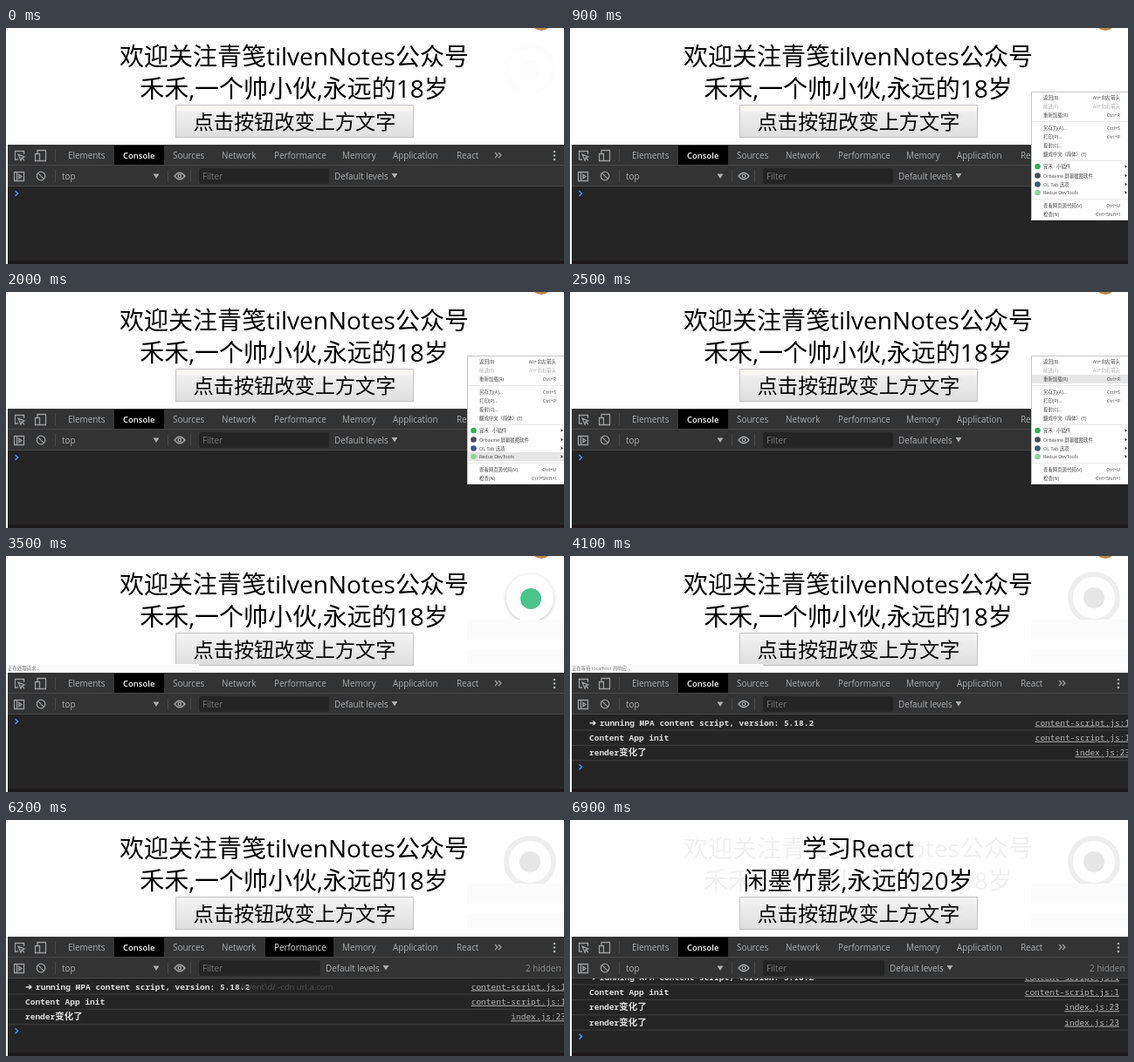
These frames come from a looping animation (639 by 271 pixels, 8000 ms). An HTML page:

```html
<!DOCTYPE html>
<html lang="zh">
<head>
<meta charset="utf-8">
<title>Console demo</title>
<style>
html, body { margin: 0; width: 100%; height: 100%; overflow: hidden; background: #fff; }
svg { display: block; width: 639px; height: 271px; }
text { font-family: "Open Sans", "Noto Sans CJK SC", "Noto Sans CJK", sans-serif; white-space: pre; }
.head { font-size: 28px; text-anchor: middle; }
.ui { font-size: 9.9px; fill: #a9adb2; }
.log, .link { font: 600 9.5px "Noto Sans Mono", "Noto Sans CJK SC", monospace; fill: #dcdcdc; }
.link { font-weight: 400; fill: #b4b4b4; text-anchor: end; text-decoration: underline; }
.item { font-size: 5.4px; fill: #444; }
.icon { fill: none; stroke: #9a9ea3; stroke-width: 1.3; }
</style>
</head>
<body>
<svg viewBox="0 0 639 271">
  <defs>
    <linearGradient id="face" x2="0" y2="1">
      <stop stop-color="#f4f4f4"/><stop offset="1" stop-color="#dedede"/>
    </linearGradient>
    <filter id="soft" x="-30%" y="-30%" width="160%" height="160%">
      <feDropShadow dx="0" dy="1" stdDeviation="2" flood-opacity=".25"/>
    </filter>
    <clipPath id="console"><path d="M2 182H639V267H2z"/></clipPath>
  </defs>

  <circle id="avatar" cx="613" cy="-9" r="12" fill="#b98a4a"/>
  <g id="ring">
    <circle cx="600" cy="48" r="27" fill="none" stroke="#eee" stroke-width="6"/>
    <circle cx="600" cy="48" r="12" fill="#e6e6e6"/>
  </g>
  <g id="badge">
    <circle cx="600" cy="48" r="27" fill="#fff" filter="url(#soft)"/>
    <circle cx="601" cy="49" r="12" fill="#4cc38a"/>
  </g>
  <path id="trace" d="M528 73H639V96H528zM528 108H639V124H528z" fill="#fbfbfb"/>

  <g id="before" class="head">
    <text x="330" y="43">欢迎关注青笺tilvenNotes公众号</text>
    <text x="330" y="80">禾禾,一个帅小伙,永远的18岁</text>
  </g>
  <g id="after" class="head">
    <text x="330" y="43">学习React</text>
    <text x="330" y="80">闲墨竹影,永远的20岁</text>
  </g>
  <rect x="194.5" y="88.5" width="272" height="37" fill="url(#face)" stroke="#c4c4c4"/>
  <path id="shine" d="M195 89H466V95H195z" fill="#f8f7f1"/>
  <text x="330.5" y="116" font-size="23.2" text-anchor="middle">点击按钮改变上方文字</text>

  <g id="status">
    <path d="M0 124H221V133H0z" fill="#fafafa"/>
    <text id="statusText" x="2" y="130.6" font-size="5.4" fill="#777"></text>
  </g>

  <path d="M2 134H639V271H2z" fill="#242424"/>
  <path d="M2 134H639V182H2z" fill="#333"/>
  <path d="M2 157.5H639M2 181.5H639M56.5 139V153M56.5 163V177M185.5 163V177M211.5 163V177" stroke="#484848"/>
  <path d="M2 267H639V271H2z" fill="#1d191a"/>
  <path d="M124 135H181V157H124z"/>
  <path id="hoverTab" d="M297 135H375V157H297z"/>
  <g id="tabs"></g>
  <g class="icon">
    <path d="M14 151H10.5V141.5H20.5V145M14 145L21 148L18 149L17 152zM18 149L21 152"/>
    <path d="M36 144V140.5H45.5V152.5H39M33.500 144.500H38.500V152.500H33.500z"/>
    <path d="M560 143L563 146L560 149M564 143L567 146L564 149"/>
    <path d="M9.500 165.500H20.500V175.500H9.500zM12.500 165V176M15 168.500L18 170.500L15 172.500z"/>
    <circle cx="40" cy="170" r="4.800"/><path d="M36.600 166.600L43.400 173.400"/>
    <path d="M193 170Q199 162.500 205 170Q199 177.500 193 170z"/><circle cx="199" cy="170" r="1.800"/>
  </g>
  <g fill="#a9adb2">
    <circle cx="628" cy="142" r="1.300"/><circle cx="628" cy="146.500" r="1.300"/><circle cx="628" cy="151" r="1.300"/>
    <path d="M168.500 167.500H175.500L172 173z"/>
  </g>
  <text class="ui" x="64" y="173.500">top</text>
  <rect id="field" x="221" y="161" height="18" rx="2" fill="#242424"/>
  <text class="ui" x="225" y="173.500" style="fill:#777">Filter</text>
  <g id="levels">
    <text class="ui" x="376" y="173.500">Default levels</text>
    <path d="M441.500 167H448.500L445 172.500z" fill="#a9adb2"/>
  </g>
  <text id="hidden" class="ui" x="595" y="173.500" style="fill:#85898d">2 hidden</text>

  <g clip-path="url(#console)">
    <g id="rows"></g>
    <path id="prompt" d="M10.500 -3L13.500 0L10.500 3" fill="none" stroke="#3a8bef" stroke-width="1.600"/>
    <text id="tip" x="268" y="195" font-size="9.500" fill="#505050">/event\d/ -cdn url:a.com</text>
  </g>

  <g id="menu">
    <rect x="528.5" y="73.500" width="113" height="147" fill="#fff" stroke="#c8c8c8"/>
    <rect id="hoverItem" x="529" width="110" height="10" fill="#e6e6e6"/>
    <path d="M529 107.500H639M529 152.500H639M529 196.500H639" stroke="#e8e8e8"/>
    <g id="items"></g>
  </g>
</svg>
<script>
const $ = id => document.getElementById(id);
const LOOP = 8000, ROW = 17.4, TOP = 191;

$('tabs').innerHTML = [['Elements', 71], ['Console', 134], ['Sources', 191], ['Network', 247],
  ['Performance', 307], ['Memory', 385], ['Application', 443], ['React', 516]]
  .map(([name, x]) => `<text class="ui" id="tab${name}" x="${x}" y="150">${name}</text>`).join('');
$('tabConsole').style.cssText = 'fill:#fff;font-weight:600;font-size:9.5px';

const cjk = s => `<tspan font-size="10.5" style="font-size:10.5px">${s}</tspan>`;
const render = 'render' + cjk('变化了');
$('rows').innerHTML = [
  ['➔<tspan x="34">running MPA content script, version: 5.18.2</tspan>', 'content-script.js:1'],
  ['Content App init', 'content-script.js:1'],
  [render, 'index.js:23'],
  [render, 'index.js:23']
].map(([msg, file], i) => {
  const y = TOP + i * ROW;
  return `<g><text class="log" x="22" y="${y + 3.5}">${msg}</text>
    <text class="link" y="${y + 3.5}">${file}</text>
    <path d="M2 ${y + 9}H639" stroke="#3c3c3c"/></g>`;
}).join('');
const rows = [...$('rows').children], links = document.querySelectorAll('.link');

// label, centre y, shortcut or '>' for a submenu, icon colour
$('items').innerHTML = [
  ['返回(B)', 80, 'Alt+向左箭头'], ['前进(F)', 90, 'Alt+向右箭头'], ['重新加载(R)', 100, 'Ctrl+R'],
  ['另存为(A)...', 114.5, 'Ctrl+S'], ['打印(P)...', 125, 'Ctrl+P'], ['投射(C)...', 134.5, ''],
  ['翻成中文（简体）(T)', 145, ''],
  ['宜禾 · 小插件', 159, '>', '#2fb457'], ['Orbavine 屏幕截图软件', 169.5, '>', '#4a4a58'],
  ['OL Tab 选项', 179.5, '>', '#3d5878'], ['Redux DevTools', 189, '>', '#8fd19a'],
  ['查看网页源代码(V)', 204, 'Ctrl+U'], ['检查(N)', 214, 'Ctrl+Shift+I']
].map(([label, y, key, dot]) => {
  const dim = y === 90 ? ' style="fill:#aaa"' : '';
  const end = key === '>' ? `<path d="M635.500 ${y - 2}L638 ${y}L635.500 ${y + 2}z" fill="#444"/>`
    : `<text class="item" x="630" y="${y + 2}" text-anchor="end"${dim}>${key}</text>`;
  return `<text class="item" x="542" y="${y + 2}"${dim}>${label}</text>${end}` +
    (dot ? `<circle cx="535.5" cy="${y}" r="3.300" fill="${dot}"/>` : '');
}).join('');

const hovers = [[0, -20], [1200, 134.5], [1300, 159], [1400, 179.5], [1500, 189], [1600, 204],
  [1800, 214], [2000, 189], [2100, 145], [2200, 125], [2400, 114.5], [2500, 100]];
const waiting = '正在等待 localhost 的响应...';
const states = [[0, ''], [2800, waiting], [3100, '正在发送请求...'], [3500, '正在处理请求...'], [3800, waiting]];

const pick = (list, t) => list.filter(([at]) => at <= t).pop()[1];
const show = (el, on) => { el.style.display = on ? '' : 'none'; };
const fade = (id, v) => { $(id).style.opacity = v; };
const ramp = (t, from, to) => Math.min(1, Math.max(0, (t - from) / (to - from)));

function draw(ms) {
  const t = Math.floor(ms / 100) * 100;

  show($('menu'), t >= 900 && t < 2800);
  const item = pick(hovers, t);
  show($('hoverItem'), item > 0);
  $('hoverItem').setAttribute('y', item - 5);

  show($('avatar'), t < 5600);
  fade('badge', t < 2800 ? 0 : t < 2900 ? .6 : 1 - ramp(t, 3700, 4100));
  fade('ring', t < 3800 ? .08 * (1 - ramp(t, 0, 400)) : ramp(t, 3700, 4100));
  show($('trace'), t >= 2800);
  show($('shine'), t < 2800);

  fade('before', t < 6800 ? 1 : t < 6900 ? .15 : .05);
  show($('after'), t >= 6800);

  $('statusText').textContent = pick(states, t);
  fade('status', t < 2800 ? 0 : 1 - ramp(t, 4600, 5200));

  const over = t >= 6200 && t < 6400;
  show($('hoverTab'), over);
  $('tabPerformance').style.fill = over ? '#e0e0e0' : '';
  show($('tip'), over);

  const filtered = t >= 4700;
  show($('hidden'), filtered);
  $('field').setAttribute('width', filtered ? 139 : 149);
  $('levels').setAttribute('transform', `translate(${filtered ? -10 : 0})`);

  const count = t >= 6800 ? 4 : Math.min(3, Math.max(0, (t - 3700) / 100));
  const scroll = t >= 6900 ? 11 : 0;
  rows.forEach((row, i) => show(row, i < count));
  links.forEach(link => link.setAttribute('x', scroll ? 629 : 641));
  $('rows').setAttribute('transform', `translate(0 ${-scroll})`);
  $('prompt').setAttribute('transform', `translate(0 ${TOP - 1 + count * ROW - scroll})`);
}

const start = performance.now();
function tick() {
  draw((performance.now() - start) % LOOP);
  requestAnimationFrame(tick);
}
tick();
</script>
</body>
</html>
```
